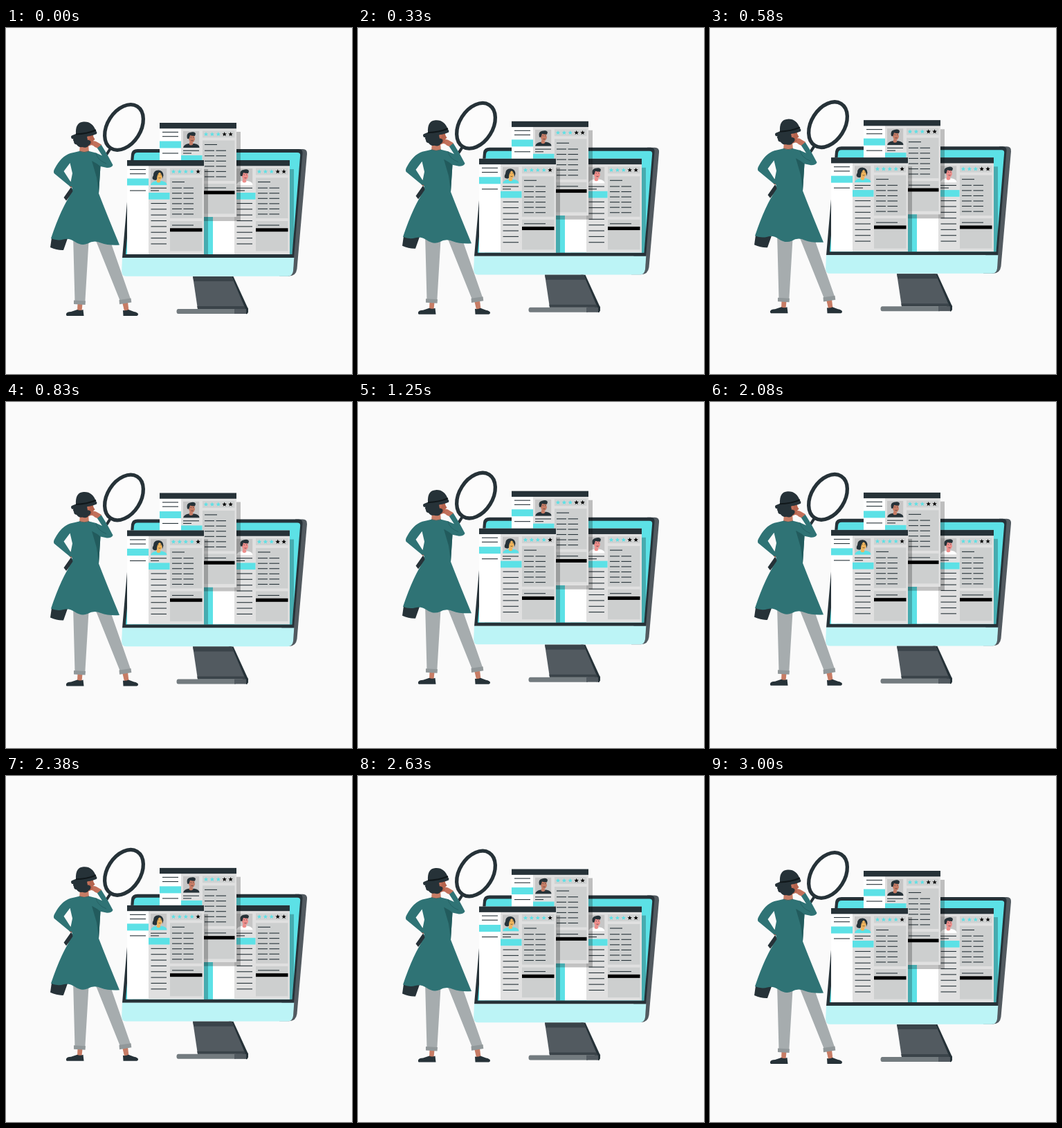
Recreate the animation shown at these times as an HTML page. Size 500 px wide and 500 px high, loop 3040 ms.

```html
<!DOCTYPE html>
<html lang="en">
<head>
<meta charset="utf-8">
<title>Profile search</title>
<style>
  html, body { margin: 0; width: 100%; height: 100%; overflow: hidden; background: #fafafa; }
  svg { display: block; width: 100%; height: 100%; }
</style>
</head>
<body>
<svg viewBox="0 0 500 500">
  <defs>
    <path id="star" d="M0-3.4L.9-1.1 3.3-1 1.4.5 2.1 2.8 0 1.5-2.1 2.8-1.4.5-3.3-1-.9-1.1Z"/>
    <clipPath id="display"><path d="M160 100H440L413.500 327H160Z"/></clipPath>
    <clipPath id="photo"><rect width="23.500" height="24"/></clipPath>
  </defs>
  <g id="scene">
    <g id="monitor">
      <path fill="#525a60" d="M418 175H429Q435.500 175 435 182L420.500 348Q419 358.500 409 358.500H395Z"/>
      <path fill="#263238" d="M190 175H423Q429 175 428.500 181L416 332H168L181 182Q182 175 190 175Z"/>
      <path fill="#5ce1e6" d="M190 180H421Q425.500 180 425.200 184L413.500 327H173L185 185Q185.500 180 190 180Z"/>
      <path fill="#bcf4f6" d="M168 332H416.300L415 351Q414 358.700 407 358.700H173Q167 358.700 167.200 351Z"/>
      <path fill="#263238" d="M322 359H328.500L350 406V409L345 413Z"/>
      <path fill="#525a60" d="M270 359H326L346 406H277Z"/>
      <path fill="#3a4349" d="M270 359H326L329.500 366H271.300ZM276.300 402H344.500L346.300 406H277Z"/>
      <path fill="#737b7f" d="M249 406H332V413H249Q246.500 413 246.500 409.500T249 406Z"/>
      <path fill="#525a60" d="M330 406H349V413H330Z"/>
      <path fill="#263238" d="M345 404H349L350 406V411L348 413.300H347V406Z"/>
    </g>
    <g id="windows"></g>
    <g id="person">
      <path fill="#263238" d="M83.500 245L94 230 98 236 87 249.500ZM66 303L64 317Q74 321.500 83 321L89 304Z"/>
      <g fill="#c77c65">
        <path d="M103.500 398H110.500L109.500 409H103ZM168 396H176L177.500 409H171Z"/>
        <path fill="#a95643" d="M91 221L96 223 96 230Q92 231 91.500 227Z"/>
      </g>
      <path fill="#263238" d="M87 413Q88 410 94 410L103 407Q107 409 111.500 407L112.500 416H88Q86.500 415.500 87 413ZM169 408Q173 409 177 407L185 410Q190.500 411 191 413.500 191 415.500 189 416H169.500Z"/>
      <g fill="#a6acae">
        <path d="M97 300H120L114.300 396H99.500ZM127 300H148L180.500 393 165.500 396Z"/>
        <path fill="#91989a" d="M98 393.500L115 394.500 114.500 400 98 399ZM163.500 393L180.500 390.500 181.300 396.500 164 399.300Z"/>
      </g>
      <path fill="#c77c65" d="M107 168H119L120 180H106Z"/>
      <path fill="#b5634d" d="M113 154L125 152 126.500 157.500 128.500 161 126.500 162.500 126 168 116 172Z"/>
      <path stroke="#263238" stroke-width="4" d="M140 191L151 174"/>
      <ellipse cx="170.500" cy="143.500" rx="24" ry="35.700" transform="rotate(32.400 170.500 143.500)" fill="#fcfcfc" stroke="#263238" stroke-width="5.300"/>
      <path fill="#2f7375" fill-rule="evenodd" d="M93 181Q100 179.500 106 178Q113 181 120 178L130 180.500 139 184.500 131.500 173 137.500 168.500Q147 183 154.500 198 153 202 146 202L136.500 200 134 239Q146 270 164 313.500 148 314.500 137 310.500 127 306 118 311.500 109 315.500 99 308.500 91 303 83 305.500 74 308 65 304 80 259 96.500 236L95 229 92.500 229 69.500 210Q68 207 70.500 203 80 185 93 181ZM92.500 195L83.500 207 93.500 222.500 96 210Z"/>
      <path fill="#225b5d" d="M124 192Q132 196 136.500 200L134 239 131 216Z"/>
      <path fill="none" stroke="#225b5d" stroke-width=".7" d="M130 180.500Q132 191 145 196M106 178Q113 181 120 178"/>
      <path fill="#c2705a" d="M124 164Q128 162 132 165L138 168.500 132 173.500Q128 172 126 170L121.500 168.500 126 167Z"/>
      <path fill="#263238" d="M99 158Q95.500 161 98 164 98 168 102 168.500 105 173 110 172 117 174 119 170 124 167 122 163 118 163 118 155Z"/>
      <path fill="#c2705a" d="M117 157Q120 154 121 158 121 162 118 162Z"/>
      <path fill="#263238" d="M101 153Q100 136 112 135.500 125 134.500 130 149 132 150 131 153 122 157 112 157 100 161 95 160 93 157 95 155.500Z"/>
      <path fill="none" stroke="#10171a" stroke-width="2" d="M101 153.500Q117 153 130 147.500"/>
    </g>
  </g>
</svg>
<script>
const DARK = '#263238', CYAN = '#5ce1e6';
const rect = (x, y, w, h, fill) => `<rect x="${x}" y="${y}" width="${w}" height="${h}" fill="${fill}"/>`;
const line = (x, y, w) => rect(x, y - .55, w, 1.1, DARK);
const range = (n, draw) => Array.from({ length: n }, (_, i) => draw(i)).join('');

const portrait = ({ skin, shirt, hair }) => `
  <g transform="translate(34 12)" clip-path="url(#photo)">
    ${rect(0, 0, 23.5, 24, '#c6c6c6')}
    <path fill="${shirt}" d="M0 24Q1 19 8 18H16Q23 19 24 24Z"/>
    <path fill="${skin}" d="M8 6Q12 3 16 6L17 12Q15 16.500 13.500 16.500L14.500 19Q11 22 8.500 19L9.500 15Q7 11 8 6Z"/>
    <path fill="${DARK}" d="${hair}"/>
    <path fill="none" stroke="${DARK}" stroke-width=".6" d="M10.500 9H12M14 9H15.500M11.500 13.500Q13 14.300 14.500 13.500"/>
  </g>`;

const profile = (x, y, rated, person) => `
  <path fill="#000" opacity=".24" d="M${x + 8} ${y + 13}H${x + 117}V${y + 142}H${x + 8}Z"/>
  <g transform="translate(${x} ${y})">
    ${rect(0, 0, 111, 136, '#fff')}
    ${rect(31, 8, 80, 128, '#e0e0e0')}
    ${rect(0, 0, 111, 8.3, DARK)}
    ${line(4, 13.5, 23)}${line(4, 19.7, 23)}${line(4, 44, 23)}
    ${rect(0, 26.5, 31, 10, CYAN)}
    ${portrait(person)}
    ${line(34, 40.3, 23)}${line(34, 44, 12)}
    ${rect(31, 47, 30.5, 9.7, CYAN)}
    ${range(8, i => line(34.5, 62.5 + i * 8.35, 22.5))}
    ${rect(62, 11.5, 46.5, 10, '#d0d2d2')}
    ${range(5, i => `<use href="#star" x="${67 + i * 8.9}" y="16.500" fill="${i < rated ? CYAN : '#000'}"/>`)}
    ${rect(62, 25.5, 46.5, 58.5, '#cdcfcf')}
    ${line(65, 31.5, 18)}${line(65, 34, 0)}
    ${range(6, i => line(65, 40.2 + i * 7.55, 14) + line(81.5, 40.2 + i * 7.55, 14.5))}
    ${rect(62, 88, 46.5, 43.5, '#cdcfcf')}
    ${line(65, 94, 31)}
    ${rect(62, 98.3, 46.5, 5, '#000')}
  </g>`;

const shortHair = 'M6 11Q4 3 10 2 17 0 18 4L17 7Q12 7 10 6L8.500 11Z';
const people = {
  dark: { skin: '#c77c65', shirt: DARK, hair: shortHair },
  blond: { skin: '#f0b45c', shirt: CYAN, hair: 'M7 17Q0 16 4 10 4 2 12 2.500 18 3 18.500 10L17 15Q17 8 13 5.500 9 8 9 16Z' },
  pink: { skin: '#ee8e8b', shirt: '#fff', hair: shortHair }
};

document.getElementById('windows').innerHTML =
  `<g clip-path="url(#display)">${profile(299, 191, 3, people.pink)}${profile(222, 137, 3, people.dark)}${profile(175, 191, 4, people.blond)}</g>`;

const scene = document.getElementById('scene');
const LOOP = 3040, FLOAT = 3000, LIFT = 10;

function render(ms) {
  const t = Math.min(ms % LOOP, FLOAT);
  const lift = LIFT * (1 - Math.abs(1 - 2 * t / FLOAT));
  scene.setAttribute('transform', `translate(0 ${-lift})`);
}

const start = performance.now();
function tick(now) {
  render(Math.max(0, now - start));
  requestAnimationFrame(tick);
}
render(0);
requestAnimationFrame(tick);
</script>
</body>
</html>
```
